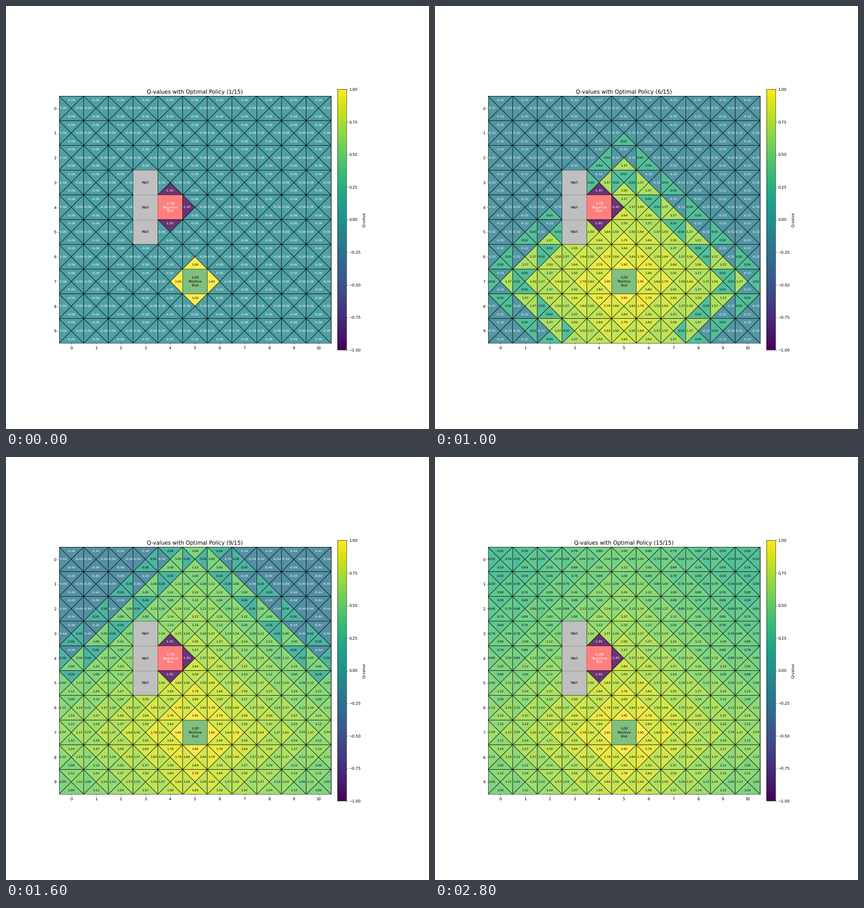
A matplotlib script for the animation above (3000 ms loop, 748 by 748 pixels).

```python
import numpy as np
import matplotlib.pyplot as plt
from matplotlib.animation import FuncAnimation
from matplotlib.cm import ScalarMappable
from matplotlib.colors import Normalize
from matplotlib.patches import Polygon, Rectangle

plt.rcParams["font.family"] = "DejaVu Sans"
plt.rcParams["text.hinting"] = "none"

ROWS, COLS = 10, 11
STEPS = 15
GAMMA, STEP_COST = 0.95, -0.06
WALLS = {(3, 3), (4, 3), (5, 3)}
ENDS = {(4, 4): -1.0, (7, 5): 1.0}
MOVES = [(-1, 0), (0, 1), (1, 0), (0, -1)]  # up, right, down, left
CELLS = [(r, c) for r in range(ROWS) for c in range(COLS)]
FREE = [s for s in CELLS if s not in WALLS and s not in ENDS]


def step(state, move):
    """Next cell and reward; walls and borders leave the agent in place."""
    r, c = state[0] + move[0], state[1] + move[1]
    if not (0 <= r < ROWS and 0 <= c < COLS) or (r, c) in WALLS:
        return state, STEP_COST
    return (r, c), ENDS.get((r, c), STEP_COST)


def value_iteration():
    values = dict.fromkeys(CELLS, 0.0)
    history = []
    for _ in range(STEPS):
        q = {}
        for s in FREE:
            for a, move in enumerate(MOVES):
                nxt, reward = step(s, move)
                q[s, a] = reward + GAMMA * values[nxt]
        history.append(q)
        values = {s: max(q[s, a] for a in range(4)) for s in FREE}
        values.update(ENDS)
    return history


def triangle(r, c, move):
    """Corners of the quarter of a cell that faces the given move."""
    dr, dc = move
    edge = np.array([c + dc / 2, r + dr / 2])
    side = np.array([dr, dc]) / 2
    return np.array([[c, r], edge - side, edge + side])


def label(x, y, text, size, color="black"):
    return ax.text(x, y, text, ha="center", va="center",
                   fontsize=size, color=color)


def block(r, c, color, text, text_color="black"):
    ax.add_patch(Rectangle((c - 0.5, r - 0.5), 1, 1, color=color, alpha=0.5))
    label(c, r, text, 9, text_color)


fig, ax = plt.subplots(figsize=(15, 15), dpi=748 / 15)
cmap = plt.get_cmap("viridis")
bar = fig.colorbar(ScalarMappable(Normalize(-1, 1), cmap), ax=ax,
                   shrink=0.8, pad=0.02, aspect=30)
bar.set_label("Q-value")

ax.set_xlim(-0.5, COLS - 0.5)
ax.set_ylim(ROWS - 0.5, -0.5)
ax.set_aspect("equal")
ax.set_xticks(range(COLS))
ax.set_yticks(range(ROWS))
title = ax.set_title("", fontsize=14)

tiles = {}
for r, c in CELLS:
    if (r, c) in WALLS:
        block(r, c, "gray", "Wall")
    elif (r, c) in ENDS:
        if ENDS[r, c] > 0:
            block(r, c, "green", "1.00\nPositive\nEnd")
        else:
            block(r, c, "red", "-1.00\nNegative\nEnd", "white")
    else:
        for a, move in enumerate(MOVES):
            pts = triangle(r, c, move)
            patch = Polygon(pts, edgecolor="black", alpha=0.8)
            ax.add_patch(patch)
            tiles[(r, c), a] = patch, label(*pts.mean(axis=0), "", 8)

history = value_iteration()


def update(i):
    q = history[i]
    limit = max(abs(v) for v in q.values())
    norm = Normalize(-limit, limit)
    for key, (patch, text) in tiles.items():
        patch.set_facecolor(cmap(norm(q[key])))
        text.set_text(f"{q[key]:.2f}")
        text.set_color("white" if q[key] < 0 else "black")
    title.set_text(f"Q-values with Optimal Policy ({i + 1}/{STEPS})")
    return []


anim = FuncAnimation(fig, update, frames=STEPS, interval=200,
                     repeat=True, repeat_delay=0, blit=False)
plt.show()
```
